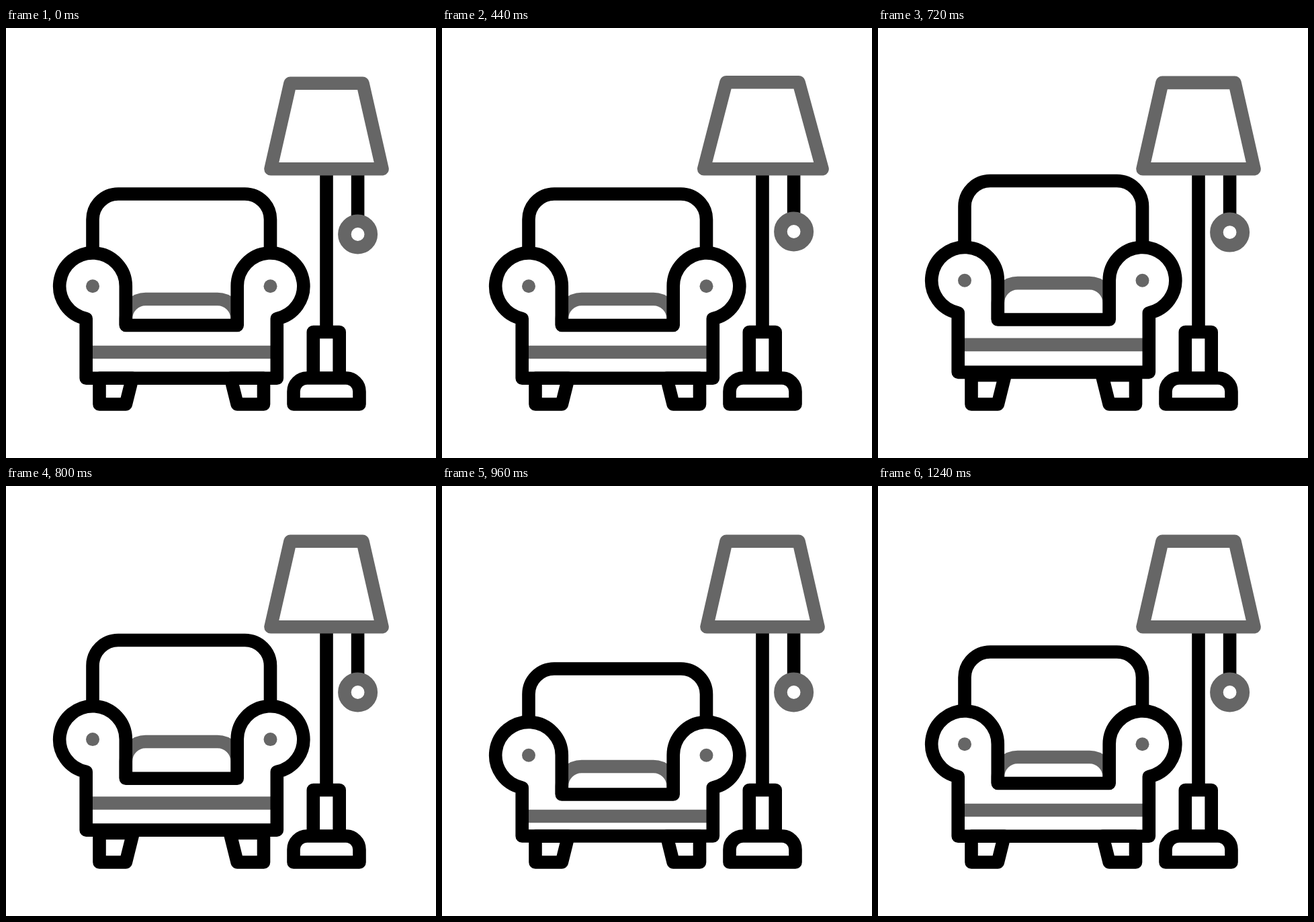
Animation of 640 by 640 pixels, one loop 2 s. Source, as an HTML page:

```html
<!DOCTYPE html>
<html lang="en">
<head>
<meta charset="utf-8">
<title>Armchair and lamp</title>
<style>
  html, body { margin: 0; width: 100%; height: 100%; overflow: hidden; background: #fff; }
  svg { display: block; width: 100%; height: 100%; }
  .line { fill: none; stroke: #000; stroke-width: 19.6; stroke-linejoin: round; }
  .grey { stroke: #666; }
  .dot { fill: #666; }
</style>
</head>
<body>
<svg viewBox="0 0 640 640">
  <path id="cushion" class="line grey"/>
  <path id="stripe" class="line grey"/>
  <path id="back" class="line"/>
  <path id="legs" class="line"/>
  <path id="body" class="line"/>
  <circle id="dotL" class="dot" cx="129" r="10"/>
  <circle id="dotR" class="dot" cx="393.5" r="10"/>

  <path class="line" d="M477 210V452.5M457.3 521V452.5H496.2V521"/>
  <path class="line" d="M428 560V541A20 20 0 0 1 448 521H506A20 20 0 0 1 526 541V560Z"/>
  <path id="cord" class="line"/>
  <circle id="bob" class="line grey" cx="523.6" r="19.7" style="fill:#fff"/>
  <path id="shade" class="line grey"/>
</svg>
<script>
  const LOOP = 2000, STEP = 40;
  const LAMP = [120, 320, 560, 760];
  const CHAIR = [560, 760, 980, 1240];
  const el = id => document.getElementById(id);
  const draw = (id, d) => el(id).setAttribute('d', d);
  const setY = (id, y) => el(id).setAttribute('cy', y);

  // Offset that goes 0 -> a -> b -> 0 at the four key times, eased in and out.
  function swing(t, keys, a, b) {
    const v = [0, a, b, 0];
    if (t <= keys[0] || t >= keys[3]) return 0;
    const i = t < keys[1] ? 0 : t < keys[2] ? 1 : 2;
    const p = (t - keys[i]) / (keys[i + 1] - keys[i]);
    return v[i] + (v[i + 1] - v[i]) * p * p * (3 - 2 * p);
  }

  function drawLamp(t) {
    const move = (a, b) => swing(t, LAMP, a, b);
    const top = 82.3 + move(6, -9);
    const left = 394 + move(-8.5, 0), right = 560 + move(12, 0);
    const bob = 307 + move(20, -28);
    draw('shade', `M423 ${top}H531L${right} 209.8H${left}Z`);
    draw('cord', `M523.6 210V${bob - 19}`);
    setY('bob', bob);
  }

  function drawChair(t) {
    const move = (a, b) => swing(t, CHAIR, a, b);
    const back = 247 + move(-21.7, 26.1);
    const arm = 384.3 + move(-9.5, 17.1);
    const pad = 403.5 + move(-26.6, 15);
    const stripe = 482.5 + move(-12.4, 9.5);
    const base = 521.3 + move(-10, 0);
    const leg = 521.3 + move(-5.2, 0);
    const seat = arm + 58.2, joint = arm + 48.2;
    const slant = (560 - leg) / 4;

    draw('back', `M129 ${arm - 48}V${back + 38}a38 38 0 0 1 38 -38H355.5a38 38 0 0 1 38 38V${arm - 48}`);
    draw('cushion', `M178.3 ${seat}V${pad + 29.5}a29.5 29.5 0 0 1 29.5 -29.5H314.7a29.5 29.5 0 0 1 29.5 29.5V${seat}`);
    draw('stripe', `M125 ${stripe}H398`);
    draw('body', `M178.3 ${seat}V${arm}A49.3 49.3 0 1 0 119.2 ${joint}V${base}H403.3V${joint}A49.3 49.3 0 1 0 344.2 ${arm}V${seat}Z`);
    draw('legs', `M139 ${leg}V560H178.3L${178.3 + slant} ${leg}ZM383.5 ${leg}V560H344.2L${344.2 - slant} ${leg}Z`);
    setY('dotL', arm);
    setY('dotR', arm);
  }

  const start = performance.now();
  function frame() {
    const now = Math.max(0, performance.now() - start) % LOOP;
    const t = Math.floor(now / STEP) * STEP;
    drawLamp(t);
    drawChair(t);
    requestAnimationFrame(frame);
  }
  frame();
</script>
</body>
</html>
```
